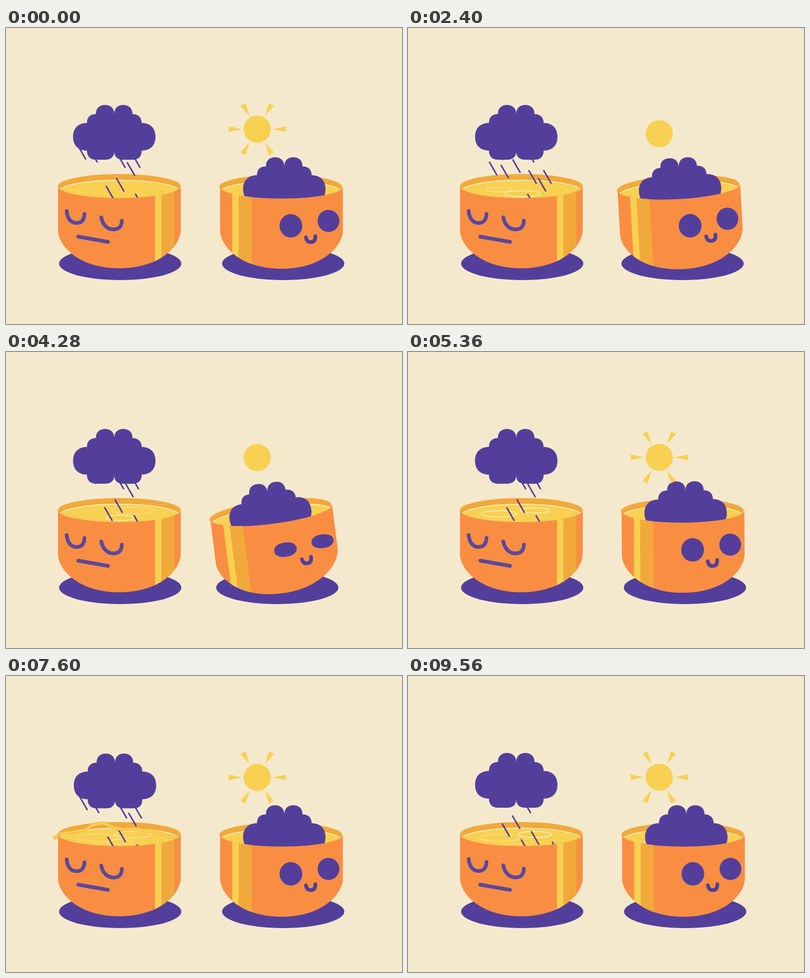
An HTML page for the animation above (9600 ms loop, 800x600 px).

```html
<!DOCTYPE html>
<html lang="en">
<head>
<meta charset="utf-8">
<title>Two bowls</title>
<style>
html, body { margin: 0; width: 100%; height: 100%; overflow: hidden; background: #f5e9cd; }
svg { display: block; width: 800px; height: 600px; }
</style>
</head>
<body>
<svg viewBox="0 0 800 600" xmlns="http://www.w3.org/2000/svg">
  <defs>
    <path id="body" d="M105 320.5V412C108 445 150 487 229 487S350 445 353 412V320.5A124 24.3 0 0 1 105 320.5Z"/>
    <path id="cloud" d="M163.5 192.5C163.5 181 170 174.5 181.5 174.5C181.5 162.5 189 156 200 156S218.7 162.5 218.7 174.5C218.7 162.5 226 156 237 156S255.5 162.5 255.5 174.5C267 174.5 274 181 274 192.5C291.5 192.5 302 203 302 220.5S291.5 248.5 274 248.5C274 260.5 268 267 256 267H237C225 267 218.7 261 218.7 250C218.7 261 212 267 200 267H182C170 267 163.5 260.5 163.5 248.5C146 248.5 135.5 238 135.5 220.5S146 192.5 163.5 192.5Z"/>
    <clipPath id="bodyClip"><use href="#body"/></clipPath>
    <clipPath id="rimClip"><ellipse cx="229" cy="320.5" rx="124" ry="24.5"/></clipPath>
    <g id="rim">
      <ellipse cx="229" cy="320.5" rx="124" ry="24.5" fill="#f2a93b"/>
      <ellipse cx="229" cy="333" rx="124" ry="24.5" fill="#f8d052" stroke="#fffbe6" stroke-width="1.3" clip-path="url(#rimClip)"/>
    </g>
  </defs>
  <rect width="800" height="600" fill="#f5e9cd"/>

  <g id="leftBowl">
    <ellipse cx="230.7" cy="477.5" rx="123.5" ry="33.5" fill="#533f9b"/>
    <use href="#rim"/>
    <g id="ripples" fill="none" stroke="#fff6d2" clip-path="url(#rimClip)"></g>
    <g id="rain" stroke="#533f9b" stroke-width="3" stroke-linecap="round"></g>
    <g id="splash" fill="none" stroke-linejoin="round">
      <path stroke="#f2a93b" stroke-width="6.6"/>
      <path stroke="#f8d052" stroke-width="4.8"/>
    </g>
    <use id="rainCloud" href="#cloud" fill="#533f9b"/>
    <use href="#body" fill="#f98e43"/>
    <g clip-path="url(#bodyClip)">
      <rect x="301" y="300" width="13" height="200" fill="#f8d052"/>
      <rect x="314" y="300" width="26" height="200" fill="#f2a93b"/>
    </g>
    <g fill="none" stroke="#5a489d" stroke-width="7.5" stroke-linecap="round">
      <path id="lidA" d="M122.5 371C124 385 130 394.5 141 395.2S158 390 158.5 377"/>
      <path id="lidB" d="M192.5 384C195 398 204 407.5 216 408.2S234 402 234 390.5"/>
      <path id="frown" d="M146 423L206 433.5"/>
    </g>
  </g>

  <ellipse id="shade" cx="560" cy="477.5" rx="123.5" ry="33.5" fill="#533f9b"/>
  <g id="bowl">
    <use href="#rim" transform="translate(326 1.5)"/>
    <use id="bowlCloud" href="#cloud" fill="#533f9b"/>
    <g transform="translate(327.5 1)">
      <use href="#body" fill="#f98e43"/>
      <g clip-path="url(#bodyClip)">
        <rect x="129.5" y="300" width="13" height="200" fill="#f8d052"/>
        <rect x="142.5" y="300" width="26" height="200" fill="#f2a93b"/>
      </g>
    </g>
    <rect id="eyeA" fill="#533f9b"/>
    <rect id="eyeB" fill="#533f9b"/>
    <path d="M606 424.5C607 431 610 434 616 434S625 430 625 422" fill="none" stroke="#533f9b" stroke-width="7.5" stroke-linecap="round"/>
  </g>

  <g id="sun" fill="#f8d052">
    <g id="rays"></g>
    <circle r="27.5"/>
  </g>
</svg>
<script>
const LOOP = 9600, STEP = 40;
const $ = id => document.getElementById(id);
const set = (el, attrs) => { for (const k in attrs) el.setAttribute(k, attrs[k]); };
const add = (parent, tag, attrs = {}) => {
  const el = document.createElementNS('http://www.w3.org/2000/svg', tag);
  set(el, attrs);
  return parent.appendChild(el);
};
const lerp = (a, b, k) => a + (b - a) * k;
const mod = (a, n) => ((a % n) + n) % n;
const ramp = (t, a, b) => Math.min(1, Math.max(0, (t - a) / (b - a)));
const ease = (t, a, b) => { const k = ramp(t, a, b); return k * k * (3 - 2 * k); };
const pulse = (t, a, b, c, d) => ease(t, a, b) - ease(t, c, d);

// Each drop slides down its own slanted lane.
const SLOPE = 0.573, FALL = 144.5, RAIN_TOP = 236, RAIN_MS = 1080;
const dropStart = [240, 321, 246, 353.5, 305, 235, 337, 257, 273, 213.6, 257];
const drops = dropStart.map(() => add($('rain'), 'line'));

function drawRain(t) {
  drops.forEach((el, i) => {
    const y = RAIN_TOP + mod(dropStart[i] + FALL * t / RAIN_MS - RAIN_TOP, FALL);
    const x = 8.7 + 10 * i + SLOPE * y;
    set(el, { x1: x, y1: y, x2: x + 14.5, y2: y + 25.3 });
  });
}

// Rings leave each pool every 17 steps, swelling then fading.
const pools = [
  { x: 184.3, y: 328, birth: 10, dot: 12 },
  { x: 256.3, y: 321.2, birth: 13.8 },
  { x: 231, y: 336, birth: 3.7, dot: 14 }
];
for (const p of pools) {
  p.rings = [0, 1].map(() => add($('ripples'), 'ellipse', { cx: p.x, cy: p.y }));
  if (p.dot) p.seed = add($('ripples'), 'ellipse', { cx: p.x - 2, cy: p.y + 0.3, 'stroke-width': 0.8 });
}

function drawRipples(t) {
  const n = t / STEP;
  for (const p of pools) {
    p.rings.forEach((el, i) => {
      const age = mod(n - p.birth, 17) + 17 * i;
      const alive = n - age >= 0 ? 1 : 0;
      const glow = ramp(age, 12, 19) * (1 - 0.55 * ramp(age, 21, 26)) * ramp(age, 29, 27.5);
      set(el, { rx: 1.62 * age, ry: 0.28 * age, 'stroke-width': 0.6 + glow, opacity: alive * glow });
    });
    if (p.seed) {
      const k = mod(n - p.dot, 17);
      set(p.seed, { rx: 5 + k * 0.3, ry: 1.3, opacity: n > 17 && k < 4.5 ? 0.45 * ramp(k, 5, 2) : 0 });
    }
  }
}

const crest = [
  [84, 328], [92, 329], [97, 321], [110, 319], [124, 318], [130, 312], [142, 309], [152, 306],
  [162, 304], [168, 299], [180, 297], [195, 294], [206, 300], [220, 305], [235, 308], [252, 306],
  [264, 311], [272, 315], [283, 321], [300, 322], [312, 319], [326, 323], [340, 326], [355, 324]
];

function drawSplash(t) {
  const k = pulse(t, 6100, 6500, 7350, 7900);
  const sway = (t - 6600) / 260;
  const pts = crest.map(([x, y], i) => {
    const px = lerp(229 + (x - 229) * 0.83, x, k);
    const u = (px - 229) / 124;
    const rest = 333 - 24.5 * Math.sqrt(Math.max(0.06, 1 - u * u));
    const wave = 3 * (Math.sin(i * 0.8 - sway) - Math.sin(i * 0.8));
    return [px, lerp(rest, y + wave, k)];
  });
  let d = 'M' + pts[0];
  for (let i = 1; i < pts.length - 1; i++) {
    const [a, b] = [pts[i], pts[i + 1]];
    d += `Q${a} ${(a[0] + b[0]) / 2},${(a[1] + b[1]) / 2}`;
  }
  d += 'L' + pts[pts.length - 1];
  for (const el of $('splash').children) el.setAttribute('d', d);
  set($('splash'), { opacity: ramp(k, 0, 0.15) });
}

function drawRainCloud(t) {
  const k = pulse(t, 5300, 5900, 7300, 8000);
  const a = (t - 6600) / 400 * 2 * Math.PI;
  set($('rainCloud'), { transform: `translate(${-2.4 * k * Math.cos(a)} ${-2.2 * k * Math.cos(a)})` });
}

function drawSadFace(t) {
  const k = pulse(t, 7400, 8350, 8800, 9500);
  const squash = (id, drop, base) => {
    const s = 1 - 0.1 * k;
    set($(id), { transform: `translate(0 ${base * (1 - s) + drop * k}) scale(1 ${s})` });
  };
  squash('lidA', 3.4, 395);
  squash('lidB', 2.2, 408);
  set($('frown'), { 'stroke-width': 7.5 - k });
}

// Lean left, then rock back and settle.
function lean(t) {
  if (t < 3350) return ease(t, 2150, 3100);
  const d = t - 3350;
  const size = 0.74 * Math.exp(-d / 1485) + 0.26 * Math.exp(-d / 120);
  return Math.cos(2 * Math.PI * d / 900) * size * (1 - ease(t, 5500, 6000));
}

function drawEye(el, x, y, rx, ry, shut, tilt) {
  const h = lerp(ry, 3.6, shut), w = lerp(rx, 22.6, shut);
  set(el, {
    x: x - w, y: y - h, width: 2 * w, height: 2 * h,
    rx: lerp(w, 3, shut ** 3), ry: lerp(h, 2.5, shut ** 3),
    transform: `rotate(${tilt * shut} ${x} ${y})`
  });
}

function drawBowl(t) {
  const s = lean(t);
  set($('shade'), { cx: 560 - 31 * s });
  set($('bowl'), { transform: `translate(${-31 * s} 0) rotate(${-18.7 * s} 573 393)` });
  set($('bowlCloud'), { transform: `translate(${343.5 - 20.5 * s} 106)` });
  const look = -4 * pulse(t, 300, 800, 2100, 2500);
  const shut = pulse(t, 2400, 2700, 4150, 4400) + pulse(t, 6720, 6860, 6920, 7080);
  drawEye($('eyeA'), 575.5 + look, 401, 23, 23.8, shut, -3);
  drawEye($('eyeB'), 651.5 + look + shut, 391 + 5.5 * shut, 22, 22.5, shut, -2);
}

for (let i = 0; i < 6; i++) {
  add($('rays'), 'path', { d: 'M31 0L57.7 -5.8V5.8Z', transform: `rotate(${i * 60})` });
}

function drawSun(t) {
  const y = 209.6 - 4.6 * Math.cos(2 * Math.PI * t / 960);
  set($('sun'), { transform: `translate(507.5 ${y})` });
  const u = ramp(t, 4250, 4750);
  const k = t < 4250 ? 1 - ease(t, 2200, 2550) : u + 0.8 * Math.sin(Math.PI * u);
  set($('rays'), { transform: `scale(${k})` });
}

function draw(t) {
  drawRain(t);
  drawRipples(t);
  drawSplash(t);
  drawRainCloud(t);
  drawSadFace(t);
  drawBowl(t);
  drawSun(t);
}

const start = performance.now();
function tick() {
  draw((performance.now() - start) % LOOP);
  requestAnimationFrame(tick);
}
tick();
</script>
</body>
</html>
```
